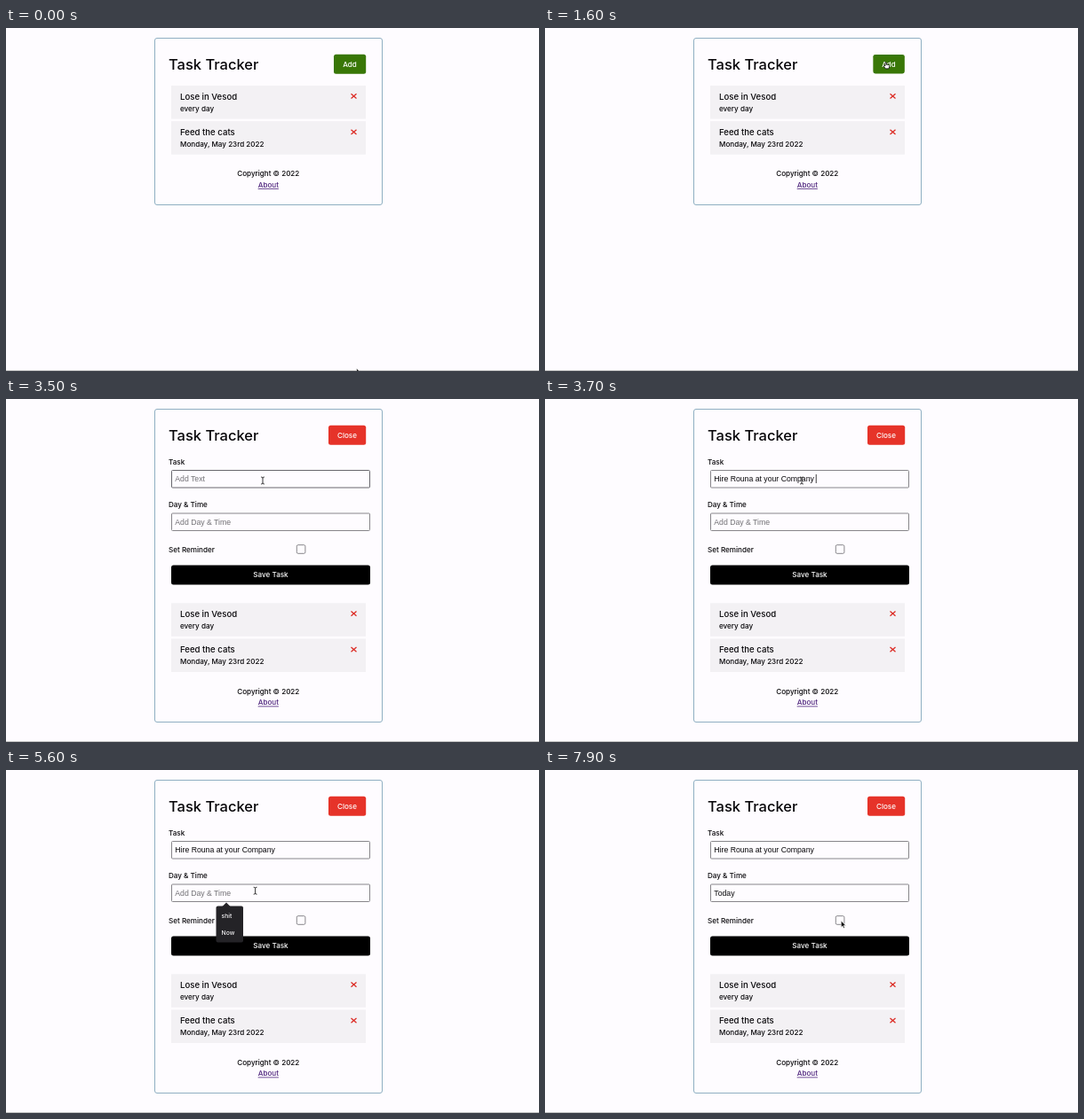
Write an HTML page that moves like this. It is 600x387 px and loops after 8000 ms.

```html
<!DOCTYPE html>
<html lang="en">
<head>
<meta charset="utf-8">
<title>Task Tracker</title>
<style>
  html, body { margin: 0; width: 100%; height: 100%; overflow: hidden; background: #fefcff; }
  svg { display: block; width: 600px; height: 387px; }
  text { font: 500 8.1px Inter, sans-serif; fill: #08070a; white-space: pre; }
  .mid { text-anchor: middle; }
  .light { fill: #fff; }
  .h1 { font-size: 16.5px; }
  .h3 { font-size: 9.6px; }
  .link { fill: #51287f; text-decoration: underline; }
  .field { font: 8.7px "Liberation Sans", Arial, sans-serif; }
  .hint { fill: #717074; }
  .menu { font-size: 6.8px; fill: #f4f3f5; }
  .box { fill: #fefcff; stroke: #87868a; }
  .item { fill: #f3f1f4; }
  .cross { fill: none; stroke: #dc2c25; stroke-width: 1.3; }
</style>
</head>
<body>
<svg viewBox="0 0 600 387">
  <path d="M0 386.5H600" stroke="#c3c3c3"/>
  <rect id="card" x="167.5" y="11.5" width="256" rx="2.5" fill="none" stroke="#8fafc2"/>
  <text class="h1" x="183" y="47">Task Tracker</text>

  <g id="add">
    <rect x="369" y="29.7" width="36.2" height="22" rx="2.5" fill="#397707"/>
    <text class="mid light" x="387" y="43.8">Add</text>
  </g>

  <g id="form">
    <rect x="363" y="29.7" width="42.2" height="22" rx="2.5" fill="#e63329"/>
    <text class="mid light" x="384" y="43.8">Close</text>
    <text x="183" y="73.6">Task</text>
    <rect id="taskBox" class="box" x="186.5" y="80.5" width="223" height="19.5" rx="1"/>
    <text id="task" class="field" x="190.3" y="93"></text>
    <text x="183" y="122.4">Day &amp; Time</text>
    <rect class="box" x="186.5" y="129" width="223" height="19.5" rx="1"/>
    <text id="day" class="field" x="190.3" y="141.6"></text>
    <text x="183" y="172.6">Set Reminder</text>
    <rect class="box" x="327.3" y="164.7" width="9.6" height="9.6" rx="1.5"/>
    <rect x="186" y="187.5" width="224" height="22" rx="2.5"/>
    <text class="mid light" x="298" y="201.4">Save Task</text>
    <path id="caret" d="M0 0v10" stroke="#111" stroke-width=".8"/>
    <g id="menu">
      <path d="M243.5 154L248 149.5L252.5 154Z" fill="#242327"/>
      <rect x="236.5" y="153.5" width="30.5" height="41" rx="2" fill="#242327"/>
      <text class="menu" x="242.5" y="167.3">shit</text>
      <text class="menu" x="242.5" y="185.8">Now</text>
    </g>
  </g>

  <g id="list">
    <rect class="item" x="186" y="65" width="219" height="37.5"/>
    <text class="h3" x="196" y="80.5">Lose in Vesod</text>
    <text x="196" y="93.7">every day</text>
    <path class="cross" d="M388.5 74.3l6 5.2m0-5.2l-6 5.2"/>
    <rect class="item" x="186" y="105.2" width="219" height="37.5"/>
    <text class="h3" x="196" y="120.9">Feed the cats</text>
    <text x="196" y="134.1">Monday, May 23rd 2022</text>
    <path class="cross" d="M388.5 114.7l6 5.2m0-5.2l-6 5.2"/>
    <text class="mid" x="295.3" y="167.4">Copyright © 2022</text>
    <text class="mid link" x="295.3" y="180.2">About</text>
  </g>

  <g id="cursor">
    <path id="arrow" d="M0 0V7.4L1.7 5.9L2.8 8.6L4.1 8.1L3 5.4H5.3Z" fill="#111" stroke="#fff" stroke-width=".6"/>
    <path id="beam" d="M-1.9-4Q0-4 0-2.8Q0-4 1.9-4M0-3V3M-1.9 4Q0 4 0 2.8Q0 4 1.9 4" fill="none" stroke="#222" stroke-width=".9"/>
    <path id="hand" d="M-1-1.5Q0-2.6.6-1.2V.9Q3.2.4 3.6 1.8V3.6L2.8 5.4H-.6L-2.8 2.6Q-2.4 1.4-1 2.2Z" fill="#fff" stroke="#111" stroke-width=".9"/>
  </g>
</svg>
<script>
const LOOP = 8000, STEP = 100;
const PRESS = 1600, OPEN = 1700, SHIFT = 165.3;
const $ = id => document.getElementById(id);

// time, x, y
const path = [
  [700, 394.6, 384], [1500, 384, 40.5], [1700, 384, 40.5],
  [2400, 313.8, 60.5], [2600, 313.8, 60.5], [3300, 289, 92],
  [4400, 289, 92], [5000, 280.6, 136.2], [7000, 280.6, 136.2], [7800, 333.3, 170]
];
// time, characters shown
const taskKeys = [[3600, 14], [3700, 27]];
const dayKeys = [[6000, 1], [6200, 2], [6400, 3], [6600, 4], [6800, 5]];
const taskCaret = [[3600, 4100], [4600, 5000]];
const dayCaret = [[5100, 5600], [6000, 7300]];

const ease = k => k * k * (3 - 2 * k);
const within = (t, spans) => spans.some(([a, b]) => t >= a && t < b);
const show = (id, on) => $(id).setAttribute("display", on ? "inline" : "none");

function position(t) {
  const i = path.findIndex(p => p[0] > t);
  if (i === 0) return path[0].slice(1);
  if (i < 0) return path[path.length - 1].slice(1);
  const [t0, x0, y0] = path[i - 1], [t1, x1, y1] = path[i];
  const k = ease((t - t0) / (t1 - t0));
  return [x0 + (x1 - x0) * k, y0 + (y1 - y0) * k];
}

function fill(id, t, value, hint, keys) {
  const count = keys.reduce((n, [at, c]) => t >= at ? c : n, 0);
  const el = $(id);
  el.textContent = count ? value.slice(0, count) : hint;
  el.classList.toggle("hint", !count);
  return 190.3 + (count ? el.getComputedTextLength() : 0);
}

function pointer(t, x, y, open) {
  const inField = open && x > 186 && x < 410 && (y > 80 && y < 100 || y > 129 && y < 149);
  const onButton = x > (open ? 363 : 369) && x < 405 && y > 30 && y < 52;
  const kind = inField ? "beam" : onButton ? "hand" : "arrow";
  for (const id of ["arrow", "beam", "hand"]) show(id, id === kind);
  $("cursor").setAttribute("transform", `translate(${x} ${y})`);
}

function draw(t) {
  const open = t >= OPEN;
  show("add", !open);
  show("form", open);
  $("card").setAttribute("height", open ? 353 : 188);
  $("list").setAttribute("transform", `translate(0 ${open ? SHIFT : 0})`);
  $("add").setAttribute("transform",
    t === PRESS ? "translate(387 40.8) scale(.98) translate(-387 -40.8)" : "");

  const taskEnd = fill("task", t, "Hire Rouna at your Company ", "Add Text", taskKeys);
  const dayEnd = fill("day", t, "Today", "Add Day & Time", dayKeys);
  $("taskBox").style.stroke = within(t, [[3400, 3600]]) ? "#68676d" : "";

  const onTask = within(t, taskCaret), onDay = within(t, dayCaret);
  show("caret", onTask || onDay);
  $("caret").setAttribute("transform",
    onTask ? `translate(${taskEnd} 85)` : `translate(${dayEnd + .4} 133.6)`);
  show("menu", within(t, [[5200, 6000]]));

  pointer(t, ...position(t), open);
}

const start = performance.now();
function tick() {
  const t = (performance.now() - start) % LOOP;
  draw(Math.floor(t / STEP) * STEP);
  requestAnimationFrame(tick);
}
tick();
</script>
</body>
</html>
```
